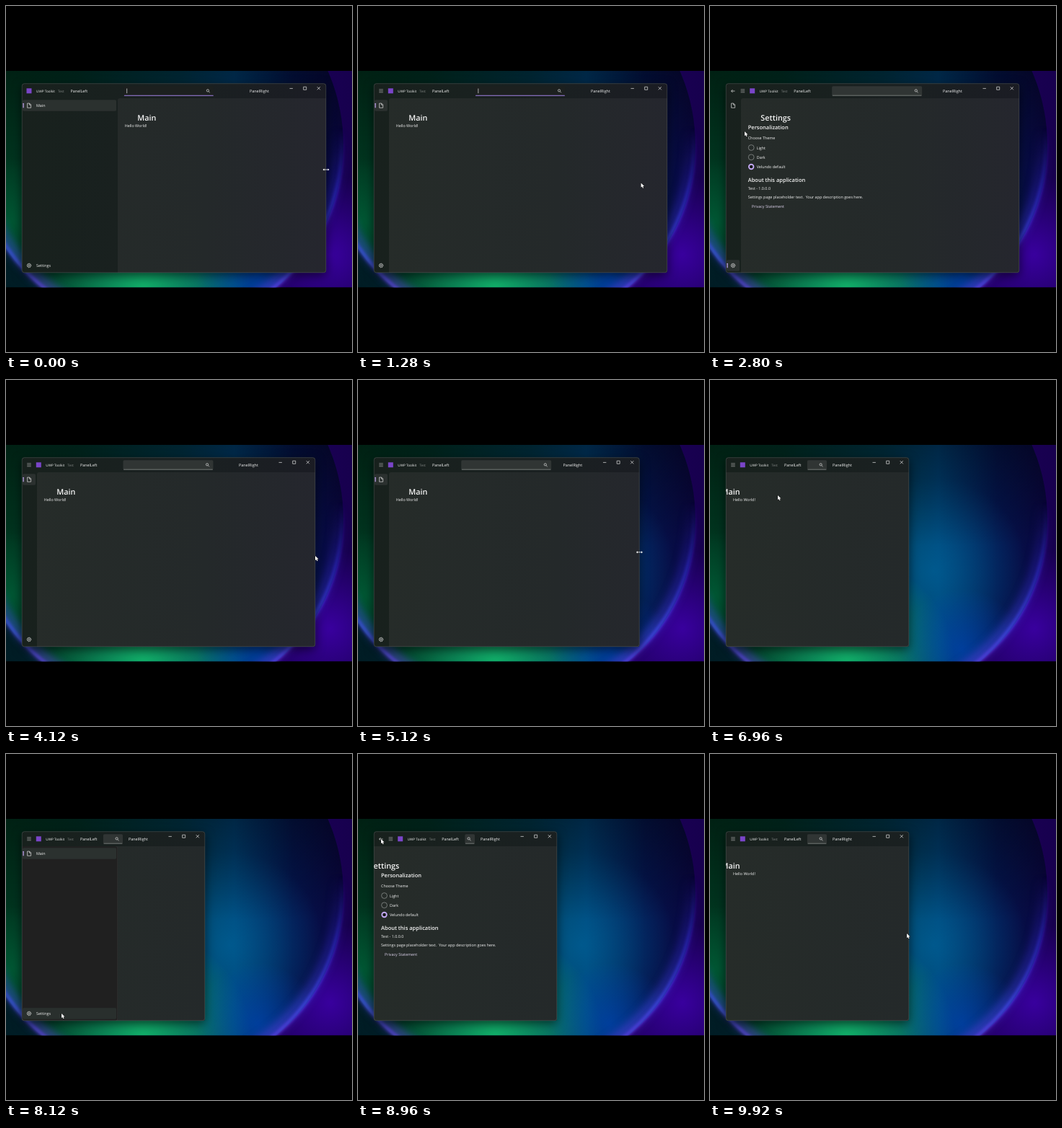
An HTML page with a canvas for the animation above (9960 ms loop, 480 px wide and 480 px high).

```html
<!DOCTYPE html>
<html lang="en">
<head>
<meta charset="utf-8">
<title>Resizable title bar</title>
<style>
html, body { margin: 0; width: 100%; height: 100%; overflow: hidden; background: #000; }
canvas { display: block; }
</style>
</head>
<body>
<canvas id="stage" width="480" height="480"></canvas>
<script>
const LOOP = 9960;
const LEFT = 22, TOP = 107.5, BOTTOM = 370, BODY = 128;
const FONT = '"Open Sans", "Noto Sans", sans-serif';
const WHITE = '#f4f4f4', ACCENT = '#c3a8f4';
const ctx = document.getElementById('stage').getContext('2d');

// Pointer path: time, x, y
const PATH = [
  [0, 444, 227], [250, 444, 227], [950, 429, 232], [1150, 429, 234],
  [1850, 33, 359], [2250, 33, 359], [2800, 48, 174], [3020, 32, 118],
  [3250, 32, 118], [4060, 429, 244], [4350, 429, 244], [5100, 392, 239],
  [5880, 335, 235], [6350, 276, 234], [6560, 276, 234], [6960, 94, 160],
  [7200, 32, 118], [7550, 32, 118], [8050, 77, 360], [8400, 77, 360],
  [8900, 32, 118], [9200, 32, 118], [9800, 273, 249], [LOOP, 273, 249]
];
const SETTINGS = [[2000, 3120], [8300, 9080]];
const MENU = [7400, 8300];

const clamp = v => Math.max(0, Math.min(1, v));
const easeOut = v => 1 - (1 - clamp(v)) ** 4;
const within = (t, [a, b]) => t >= a && t < b;

function pointer(t) {
  const i = PATH.findIndex(k => k[0] > t);
  const [t0, x0, y0] = PATH[i - 1], [t1, x1, y1] = PATH[i];
  let p = (t - t0) / (t1 - t0);
  if (t < 4350 || t > 6350) p = p * p * (3 - 2 * p);
  return [x0 + (x1 - x0) * p, y0 + (y1 - y0) * p];
}

function rightEdge(t) {
  if (t < 950) return pointer(t)[0];
  if (t < 4350) return 429;
  return t < 6350 ? pointer(t)[0] : 276;
}

function gradient(g, fill, stops) {
  stops.forEach(([p, c]) => fill.addColorStop(p, c));
  g.fillStyle = fill;
}

function text(str, x, y, size = 5.4, color = WHITE, weight = 400) {
  ctx.font = `${weight} ${size}px ${FONT}`;
  ctx.fillStyle = color;
  ctx.fillText(str, x, y);
}

function box(x, y, w, h, r, color) {
  ctx.beginPath();
  ctx.roundRect(x, y, w, h, r);
  ctx.fillStyle = color;
  ctx.fill();
}

function line(d, color = '#e4e4e4', width = 0.7) {
  ctx.strokeStyle = color;
  ctx.lineWidth = width;
  ctx.stroke(new Path2D(d));
}

function circle(x, y, r, color, width) {
  ctx.beginPath();
  ctx.arc(x, y, r, 0, Math.PI * 2);
  if (width) {
    ctx.strokeStyle = color;
    ctx.lineWidth = width;
    ctx.stroke();
  } else {
    ctx.fillStyle = color;
    ctx.fill();
  }
}

function makeWallpaper() {
  const canvas = document.createElement('canvas');
  canvas.width = canvas.height = 480;
  const g = canvas.getContext('2d');
  const paint = () => g.fillRect(0, 90, 480, 300.5);
  const glow = (x, y, r, rgb, alpha) => {
    gradient(g, g.createRadialGradient(x, y, 0, x, y, r),
      [[0, `rgba(${rgb},${alpha})`], [0.5, `rgba(${rgb},${alpha * 0.5})`], [1, `rgba(${rgb},0)`]]);
    paint();
  };
  g.beginPath();
  g.rect(0, 90, 480, 300.5);
  g.clip();

  gradient(g, g.createLinearGradient(0, 0, 480, 0),
    [[0, '#001c24'], [0.5, '#002a3a'], [0.8, '#1c0058'], [1, '#17004e']]);
  paint();
  glow(450, 345, 110, '70,0,190', 0.7);

  g.save();
  g.beginPath();
  g.arc(212, 193, 256, 0, Math.PI * 2);
  g.clip();
  gradient(g, g.createLinearGradient(0, 0, 480, 0),
    [[0, '#00361f'], [0.2, '#003528'], [0.5, '#003a4e'], [0.66, '#004072'], [0.83, '#04154e'], [0.97, '#09063e']]);
  paint();
  glow(310, 265, 130, '0,105,160', 0.6);
  glow(5, 300, 90, '0,110,65', 0.6);
  glow(190, 395, 150, '20,190,110', 0.9);
  glow(350, 375, 85, '0,70,190', 0.6);
  gradient(g, g.createLinearGradient(0, 90, 0, 230), [[0, 'rgba(0,0,0,.4)'], [1, 'rgba(0,0,0,0)']]);
  paint();
  g.restore();

  const rim = g.createLinearGradient(0, 170, 0, 390);
  [[0, 'rgba(60,40,220,0)'], [0.4, 'rgba(60,50,240,.7)'], [0.8, '#4a50ff'], [1, '#6a40f0']]
    .forEach(([p, c]) => rim.addColorStop(p, c));
  g.strokeStyle = rim;
  [[14, 6, 0.45, 249], [4, 2, 0.85, 254]].forEach(([width, blur, alpha, r]) => {
    g.lineWidth = width;
    g.filter = `blur(${blur}px)`;
    g.globalAlpha = alpha;
    g.beginPath();
    g.arc(212, 193, r, 0, Math.PI * 2);
    g.stroke();
  });
  return canvas;
}
const wallpaper = makeWallpaper();

function gear(x, y) {
  circle(x, y, 2.3, '#d8d8d8', 0.6);
  circle(x, y, 0.9, '#d8d8d8', 0.6);
  ctx.setLineDash([1.1, 1.1]);
  circle(x, y, 2.8, '#d8d8d8', 0.8);
  ctx.setLineDash([]);
}

function titleBar(right, expanded, back, focused, t) {
  let x = 32;
  if (back) {
    line(`M${x + 2.5} 118h-5m2-2l-2 2l2 2`);
    x += 13.4;
  }
  if (!expanded) {
    line(`M${x - 2.8} 115.8h5.6m-5.6 2h5.6m-5.6 2h5.6`, '#bbb', 0.6);
    x += 13.3;
  }
  box(x - 3.5, 114.3, 7, 7, 0, '#7a45c8');
  text('UWP Toolkit', x + 10, 119.8, 4.65);
  text('Test', x + 40, 119.8, 4.65, '#858987');
  text('PanelLeft', x + 57.6, 120.1);
  text('PanelRight', right - 106, 120.1);

  const from = x + 89.6, to = right - 114;
  const w = Math.min(125, to - from), sx = (from + to - w) / 2;
  box(sx, 111.3, w, 13.2, 1.7, focused ? '#1c201f' : '#303534');
  box(sx + 0.5, 123.7, w - 1, focused ? 1 : 0.7, 0.4, focused ? '#a382e6' : '#8a8f8d');
  if (focused && t % 1060 < 530) line(`M${sx + 4.4} 114.5v6.6`, '#eee', 0.7);
  circle(sx + w - 8.4, 117.3, 1.6, '#ddd', 0.7);
  line(`M${sx + w - 7.2} 118.5l1.7 1.7`);

  line(`M${right - 50.5} 114.4h4.4`);
  line(`M${right - 31.3} 112.2h4v4h-4z`);
  line(`M${right - 12.3} 112.1l4.2 4.2m0 -4.2l-4.2 4.2`);
}

function navigation(width, settings, hover) {
  const item = (y, active, over) => {
    if (active || over) box(LEFT + 1, y - 7.7, width - 3, 15.4, 1.7, active ? '#2b312f' : '#292f2d');
    if (active) box(LEFT + 1.5, y - 3.3, 1.2, 6.6, 0.6, ACCENT);
  };
  item(138, !settings, hover === 'main');
  item(360, settings, hover === 'settings');
  line('M29.6 135h3l2 2v4.2h-5zM32.4 135v2.2h2.2', '#e0e0e0', 0.7);
  gear(32, 360);
  if (width > 30) {
    ctx.save();
    ctx.beginPath();
    ctx.rect(LEFT, BODY, width, BOTTOM - BODY);
    ctx.clip();
    text('Main', 42, 140.1);
    text('Settings', 42, 362.4);
    ctx.restore();
  }
}

function page(x, titleX, settings) {
  text(settings ? 'Settings' : 'Main', titleX, 159, 10.8, WHITE, 600);
  if (!settings) {
    text('Hello World!', x, 168.4);
    return;
  }
  text('Personalization', x, 171.3, 7.5, WHITE, 600);
  text('Choose Theme', x, 184.7);
  ['Light', 'Dark', 'Velundo default'].forEach((label, i) => {
    const y = 196.5 + i * 13.25;
    if (i === 2) {
      circle(x + 4.5, y, 4.2, ACCENT);
      circle(x + 4.5, y, 2.3, '#151816');
    } else {
      circle(x + 4.5, y, 3.9, '#959a98', 0.7);
    }
    text(label, x + 12, y + 2.1);
  });
  text('About this application', x, 243.6, 7.5, WHITE, 600);
  text('Test - 1.0.0.0', x, 255.3);
  text('Settings page placeholder text.  Your app description goes here.', x, 266.7);
  text('Privacy Statement', x + 5, 280.4, 5.4, '#dcd2ec');
}

function drawPointer(x, y, resizing) {
  if (resizing) {
    line(`M${x - 3.5} ${y}h7`, '#fff', 0.8);
    ctx.fillStyle = '#fff';
    ctx.fill(new Path2D(`M${x - 4.5} ${y}l2 -1.6v3.2zM${x + 4.5} ${y}l-2 -1.6v3.2z`));
    return;
  }
  const arrow = new Path2D(`M${x} ${y}v6.2l1.4 -1.3l1.1 2.3l1.1 -.5l-1 -2.3h2z`);
  ctx.strokeStyle = '#000';
  ctx.lineWidth = 0.8;
  ctx.stroke(arrow);
  ctx.fillStyle = '#fff';
  ctx.fill(arrow);
}

function draw(t) {
  const right = rightEdge(t), w = right - LEFT, h = BOTTOM - TOP;
  const [px, py] = pointer(t);
  const expanded = right > 437, minimal = right < 286;
  const settings = SETTINGS.some(span => within(t, span));
  const paneWidth = expanded ? 133 : minimal ? 0 : 21;
  const bodyX = LEFT + paneWidth;

  ctx.fillStyle = '#000';
  ctx.fillRect(0, 0, 480, 480);
  ctx.drawImage(wallpaper, 0, 0);

  ctx.save();
  ctx.beginPath();
  ctx.rect(0, 90, 480, 300.5);
  ctx.clip();
  ctx.shadowColor = 'rgba(0,0,0,.6)';
  ctx.shadowBlur = 14;
  ctx.shadowOffsetY = 4;
  box(LEFT, TOP, w, h, 3.3, '#1a201f');
  ctx.restore();

  ctx.save();
  ctx.beginPath();
  ctx.roundRect(LEFT, TOP, w, h, 3.3);
  ctx.clip();
  gradient(ctx, ctx.createLinearGradient(LEFT, 0, 444, 0),
    [[0, '#18211d'], [0.6, '#1a2021'], [1, '#1b1c24']]);
  ctx.fillRect(LEFT, TOP, w, h);
  gradient(ctx, ctx.createLinearGradient(LEFT, 0, 444, 0),
    [[0, '#262c29'], [0.6, '#24292a'], [1, '#25262e']]);
  ctx.beginPath();
  ctx.roundRect(bodyX, BODY, right - bodyX, BOTTOM - BODY, [minimal ? 0 : 3, 0, 0, 0]);
  ctx.fill();

  titleBar(right, expanded, settings, t < 1900, t);

  const near = px < LEFT + Math.max(paneWidth, minimal ? 133 : 0);
  const hover = near && Math.abs(py - 360) < 8 ? 'settings' : near && Math.abs(py - 138) < 8 ? 'main' : '';
  if (!minimal) navigation(paneWidth, settings, hover);

  const changes = SETTINGS.flat().filter(at => at <= t);
  const enter = changes.length ? easeOut((t - changes.at(-1)) / 320) : 1;
  ctx.save();
  ctx.beginPath();
  ctx.rect(bodyX, BODY, right - bodyX, BOTTOM - BODY);
  ctx.clip();
  ctx.globalAlpha = enter;
  ctx.translate(0, (1 - enter) * 40);
  page(bodyX + (minimal ? 10 : 9.7), minimal ? 15.5 : bodyX + 27.3, settings);
  ctx.restore();

  if (within(t, [MENU[0], MENU[1] + 130])) {
    const open = easeOut((t - MENU[0]) / 220) * (1 - clamp((t - MENU[1]) / 130));
    const width = 133 * open;
    ctx.save();
    ctx.beginPath();
    ctx.rect(LEFT, BODY, width, BOTTOM - BODY);
    ctx.clip();
    box(LEFT, BODY, width, BOTTOM - BODY, [0, 3, 3, 0], '#343434');
    box(LEFT, BODY, width - 0.6, BOTTOM - BODY, [0, 3, 3, 0], '#202020');
    navigation(133, settings, hover);
    ctx.restore();
  }
  ctx.restore();

  ctx.beginPath();
  ctx.roundRect(LEFT + 0.2, TOP + 0.2, w - 0.4, h - 0.4, 3.3);
  ctx.strokeStyle = 'rgba(110,115,115,.5)';
  ctx.lineWidth = 0.7;
  ctx.stroke();

  drawPointer(px, py, t < 1150 || within(t, [4200, 6560]));
}

ctx.textRendering = 'geometricPrecision';
const start = performance.now();
function tick() {
  draw((performance.now() - start) % LOOP);
  requestAnimationFrame(tick);
}
tick();
</script>
</body>
</html>
```
